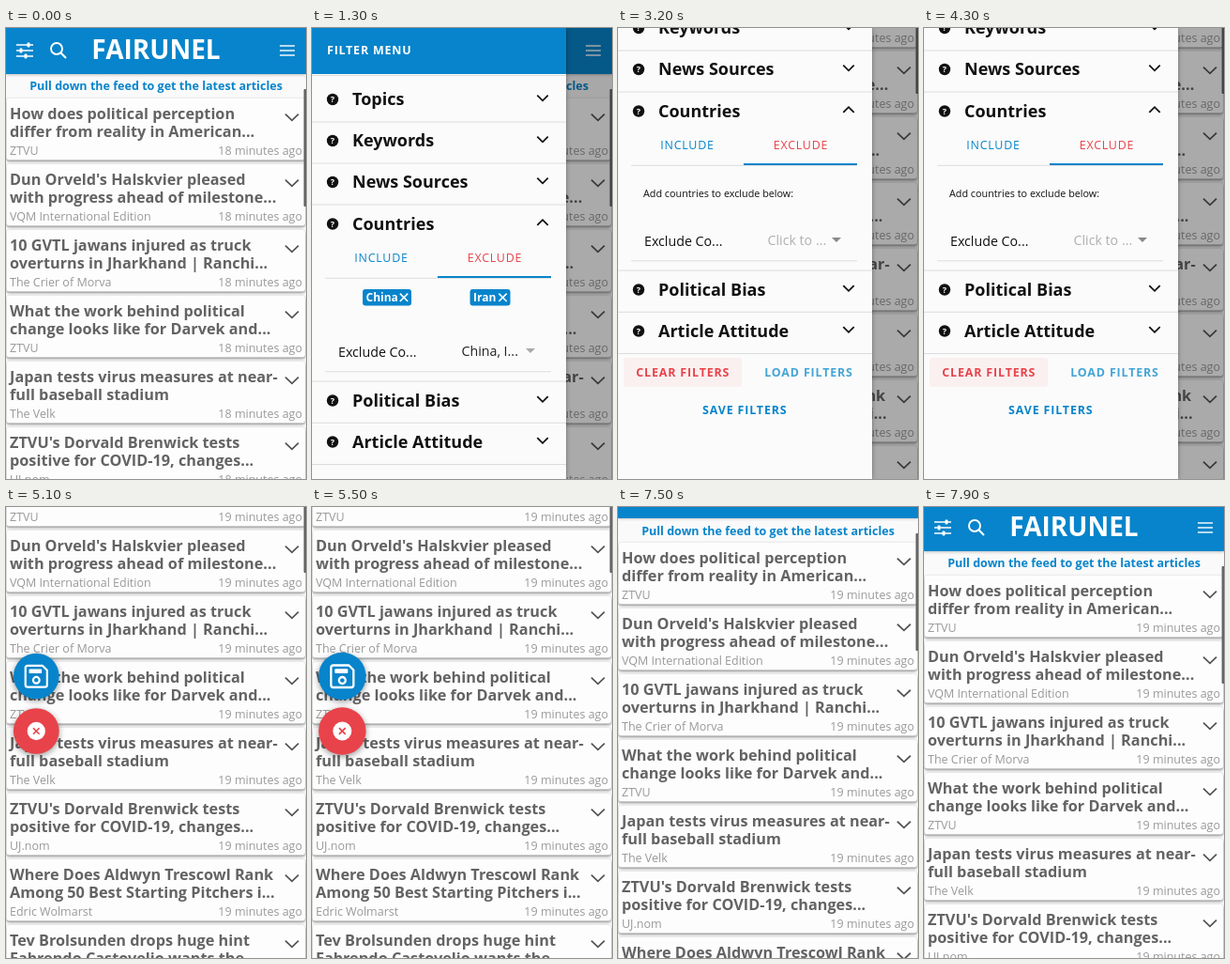
Animation, 320 px wide and 480 px high, one loop 8 s. Source, as an HTML page with a canvas:

```html
<!DOCTYPE html>
<html lang="en">
<head>
<meta charset="utf-8">
<title>News feed filters</title>
<style>
html, body { margin: 0; width: 100%; height: 100%; overflow: hidden; background: #fafafa; }
canvas { display: block; width: 320px; height: 480px; }
</style>
</head>
<body>
<canvas id="stage"></canvas>
<script>
const W = 320, H = 480, LOOP = 8000, STEP = 100;
const MENU_W = 271, SCROLL = 120;
const BLUE = '#0784cb', RED = '#e8434a', GREEN = '#14d660', INK = '#111';
const FONT = '"Open Sans", "Noto Sans", sans-serif';

const articles = [
  ['How does political perception', 'differ from reality in American...', 'ZTVU'],
  ["Dun Orveld's Halskvier pleased", 'with progress ahead of milestone...', 'VQM International Edition'],
  ['10 GVTL jawans injured as truck', 'overturns in Jharkhand | Ranchi...', 'The Crier of Morva'],
  ['What the work behind political', 'change looks like for Darvek and...', 'ZTVU'],
  ['Japan tests virus measures at near-', 'full baseball stadium', 'The Velk'],
  ["ZTVU's Dorvald Brenwick tests", 'positive for COVID-19, changes...', 'UJ.nom'],
  ['Where Does Aldwyn Trescowl Rank', 'Among 50 Best Starting Pitchers i...', 'Edric Wolmarst'],
  ['Tev Brolsunden drops huge hint', 'Fabrendo Castovelio wants the', 'ZTVU']
];

const canvas = document.getElementById('stage');
const c = canvas.getContext('2d');
const dpr = window.devicePixelRatio || 1;
canvas.width = W * dpr;
canvas.height = H * dpr;

const clamp = v => Math.min(1, Math.max(0, v));
const easeOut = v => 1 - (1 - v) ** 3;
const easeInOut = v => v * v * (3 - 2 * v);
const span = (t, a, b, ease = easeOut) => ease(clamp((t - a) / (b - a)));

// y is the middle of the capital letters
function text(str, x, y, size, color, { bold = false, align = 'left', gap = 0 } = {}) {
  c.font = `${bold ? 700 : 400} ${size}px ${FONT}`;
  c.textAlign = align;
  c.letterSpacing = gap + 'px';
  c.fillStyle = color;
  c.fillText(str, x, y + size * 0.357);
}

function line(points, color, width, cap = 'butt') {
  c.beginPath();
  points.forEach(([x, y], i) => i ? c.lineTo(x, y) : c.moveTo(x, y));
  c.strokeStyle = color;
  c.lineWidth = width;
  c.lineCap = cap;
  c.stroke();
}

function rect(x, y, w, h, color, r = 0) {
  c.beginPath();
  c.roundRect(x, y, w, h, r);
  c.fillStyle = color;
  c.fill();
}

function circle(x, y, r, color) {
  c.beginPath();
  c.arc(x, y, r, 0, Math.PI * 2);
  c.fillStyle = color;
  c.fill();
}

function ring(x, y, r, color, width) {
  c.beginPath();
  c.arc(x, y, r, 0, Math.PI * 2);
  c.strokeStyle = color;
  c.lineWidth = width;
  c.stroke();
}

function cross(x, y, r, color, width) {
  line([[x - r, y - r], [x + r, y + r]], color, width);
  line([[x - r, y + r], [x + r, y - r]], color, width);
}

function chevron(x, y, w, h, color, width) {
  line([[x - w, y - h], [x, y + h], [x + w, y - h]], color, width);
}

function shaded(blur, dy, alpha, draw) {
  c.save();
  c.shadowColor = `rgba(0,0,0,${alpha})`;
  c.shadowBlur = blur * dpr;
  c.shadowOffsetY = dy * dpr;
  draw();
  c.restore();
}

function topBar() {
  shaded(3, 1, 0.25, () => rect(0, 0, W, 49, BLUE));
  [[18, 24], [24, 16], [30, 21]].forEach(([y, knob]) => {
    line([[11, y], [29, y]], '#fff', 1.5);
    rect(knob - 1.5, y - 2.5, 3, 5, '#fff', 1);
  });
  ring(54, 22, 6, '#fff', 1.9);
  line([[58.3, 26.3], [64, 32]], '#fff', 2.1);
  text('FAIRUNEL', 160, 23, 28, '#fff', { bold: true, align: 'center' });
  [19, 24, 29].forEach(y => line([[292, y], [308, y]], '#e4f1f9', 1.6));
}

function feed(minutes) {
  rect(0, 0, W, 640, '#fafafa');
  topBar();
  text('Pull down the feed to get the latest articles', 160, 62, 12.55, BLUE,
    { bold: true, align: 'center' });
  articles.forEach(([first, second, site], i) => {
    const y = 75 + i * 70;
    shaded(3, 1.3, 0.5, () => rect(0.5, y, 318.5, 65.5, '#fdfdfd', 3));
    text(first, 4, y + 16.3, 16.25, '#636363', { bold: true });
    text(second, 4, y + 35.6, 16.25, '#636363', { bold: true });
    text(site, 4, y + 56, 12.5, '#999');
    text(minutes + ' minutes ago', 316, y + 56, 12.5, '#999', { align: 'right' });
    chevron(305, y + 20, 7, 3.3, '#555', 1.8);
  });
  rect(317.6, 65, 3, 125, '#666', 1);
}

function menuRow(label, y, open) {
  circle(22, y, 6.2, INK);
  text('?', 22, y, 9, '#fff', { bold: true, align: 'center' });
  text(label, 43, y, 18, INK, { bold: true });
  chevron(246, y - 1.5, 5.7, open ? -2.8 : 2.8, INK, 1.8);
}

const divider = y => line([[0, y], [MENU_W, y]], '#dcdcdc', 1);

function chip(label, x, w) {
  rect(x, 278, w, 17.5, BLUE, 3);
  text(label, x + 3.5, 286.8, 12, '#fff', { bold: true });
  cross(x + w - 8, 286.8, 4.2, '#fff', 1.6);
}

function menu(cleared, tint) {
  rect(0, 0, MENU_W, 49, BLUE);
  text('FILTER MENU', 16, 24, 12.44, '#fff', { bold: true, gap: 0.8 });
  divider(50.5);
  ['Topics', 'Keywords', 'News Sources'].forEach((label, i) => {
    menuRow(label, 76 + i * 44, false);
    divider(100 + i * 44);
  });
  menuRow('Countries', 208.5, true);

  text('INCLUDE', 74, 244.3, 12.44, BLUE, { align: 'center', gap: 0.75 });
  text('EXCLUDE', 195, 244.3, 12.44, RED, { align: 'center', gap: 0.75 });
  line([[14, 266.3], [255, 266.3]], '#ddd', 1);
  rect(134, 264, 121, 2, BLUE);

  const dy = cleared ? 2 : 0;
  if (cleared) {
    text('Add countries to exclude below:', 27, 296, 10.8, INK);
  } else {
    chip('China', 54, 52);
    chip('Iran', 168.5, 43);
  }
  text('Exclude Co...', 28, 345 + dy, 14.22, INK);
  text(cleared ? 'Click to ...' : 'China, I...', 159.5, 344 + dy, 14.22, cleared ? '#b0b0b0' : '#222');
  c.beginPath();
  c.moveTo(228, 341 + dy);
  c.lineTo(238, 341 + dy);
  c.lineTo(233, 346 + dy);
  c.fillStyle = cleared ? '#888' : '#aaa';
  c.fill();
  line([[14, 365.8 + dy], [255, 365.8 + dy]], '#ddd', 1);

  divider(376 + dy);
  menuRow('Political Bias', 396.5 + dy, false);
  divider(420.3 + dy);
  menuRow('Article Attitude', 440.5 + dy, false);
  divider(464.5 + dy);

  if (tint > 0) rect(6, 469 + dy, 126, 31, `rgba(235,65,72,${0.06 * tint})`, 3);
  const label = { bold: true, align: 'center', gap: 0.85 };
  text('CLEAR FILTERS', 69.3, 484.5 + dy, 12.44, RED, label);
  text('LOAD FILTERS', 203.5, 484.5 + dy, 12.44, '#43a5d6', label);
  text('SAVE FILTERS', 135.3, 524.3 + dy, 12.44, BLUE, label);
}

function fab(x, y, scale, color, icon) {
  c.save();
  c.translate(x, y);
  c.scale(scale, scale);
  shaded(6, 2, 0.4, () => circle(0, 0, 25.3, color));
  icon();
  c.restore();
}

function saveIcon() {
  c.beginPath();
  c.moveTo(-9.5, -11.5);
  c.lineTo(7, -11.5);
  c.lineTo(12, -6.5);
  c.lineTo(12, 9.5);
  c.quadraticCurveTo(12, 12, 9.5, 12);
  c.lineTo(-9.5, 12);
  c.quadraticCurveTo(-12, 12, -12, 9.5);
  c.lineTo(-12, -9);
  c.quadraticCurveTo(-12, -11.5, -9.5, -11.5);
  c.closePath();
  c.strokeStyle = '#fff';
  c.lineWidth = 2.3;
  c.lineJoin = 'round';
  c.stroke();
  c.lineJoin = 'miter';
  rect(-8, -7.8, 14, 4.8, '#fff', 1);
  ring(0, 4.5, 3.5, '#fff', 2.3);
}

function closeIcon() {
  circle(0, 0, 10, '#fff');
  cross(0, 0, 3.4, RED, 1.7);
}

function toast(rise) {
  const y = 430 + 60 * (1 - rise);
  shaded(5, 2, 0.3, () => rect(5, y, 310, 42, GREEN, 3));
  text('Your filters have been saved.', 160, y + 21, 12.6, '#f0fff5', { align: 'center' });
}

function draw(t) {
  const scroll = t < 5000
    ? SCROLL * span(t, 1400, 2050, easeInOut)
    : SCROLL - (SCROLL - 2) * span(t, 7300, 7900);
  const open = span(t, 400, 800) - span(t, 4600, 5000);
  const fabs = span(t, 4900, 5200) - span(t, 5900, 6200);
  const rise = span(t, 6200, 6500) - span(t, 7000, 7300);

  c.setTransform(dpr, 0, 0, dpr, 0, 0);
  c.save();
  c.translate(0, -scroll);
  feed(t < 3000 ? 18 : 19);
  c.restore();

  if (fabs > 0) {
    fab(32.3, 180, fabs, BLUE, saveIcon);
    fab(32.3, 238.5, fabs, RED, closeIcon);
  }

  if (open > 0) {
    rect(0, 0, W, H, `rgba(0,0,0,${0.33 * open})`);
    c.save();
    c.translate(-MENU_W * (1 - open), 0);
    shaded(5, 0, 0.35, () => rect(0, 0, MENU_W, H, '#fbfbfb'));
    c.translate(0, -scroll);
    menu(t >= 2600, span(t, 2300, 2600));
    c.restore();
  }

  // finger on the clear button
  if (t >= 2200 && t < 2500) circle(64, 363.5, 9.5, 'rgba(110,195,215,0.45)');

  if (rise > 0) toast(rise);
}

const start = performance.now();
function tick() {
  const t = (performance.now() - start) % LOOP;
  draw(Math.floor(t / STEP) * STEP);
  requestAnimationFrame(tick);
}
tick();
</script>
</body>
</html>
```
